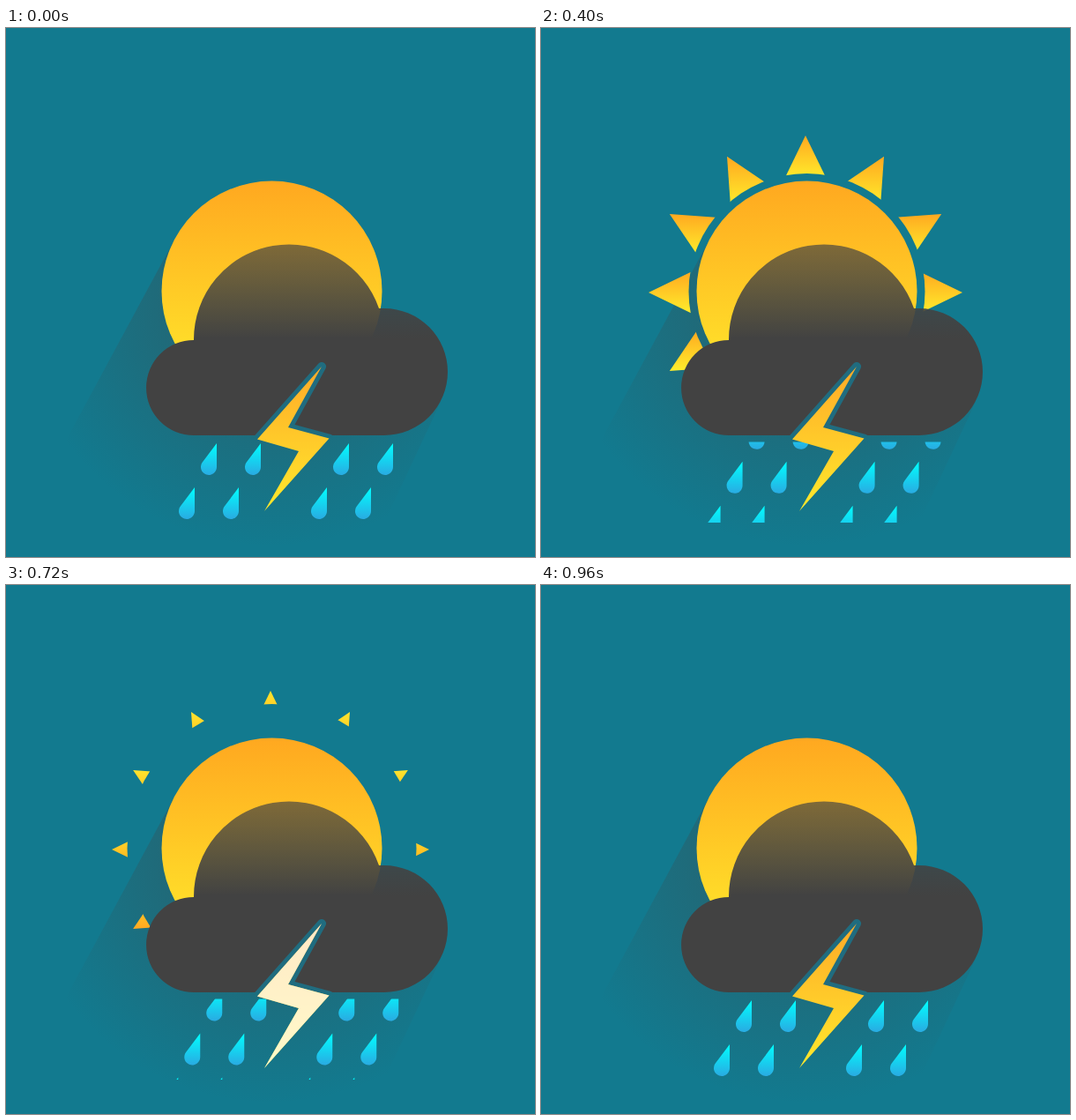
An HTML page that plays this animation: 600 px wide and 600 px high, repeating every 1 s.

```html
<!DOCTYPE html>
<html lang="en">
<head>
<meta charset="utf-8">
<title>Thunderstorm</title>
<style>
  html, body { margin: 0; width: 100%; height: 100%; overflow: hidden; background: #127a8f; }
  svg { display: block; width: 100vw; height: 100vh; }
</style>
</head>
<body>
<svg viewBox="0 0 600 600">
  <defs>
    <linearGradient id="warm" x2="0" y2="1">
      <stop stop-color="#ffa820"/><stop offset="1" stop-color="#ffee2c"/>
    </linearGradient>
    <linearGradient id="warmUp" x2="0" y2="1">
      <stop stop-color="#ffe42c"/><stop offset="1" stop-color="#ffa820"/>
    </linearGradient>
    <linearGradient id="boltFill" x2="0" y2="1">
      <stop stop-color="#ffaa28"/><stop offset="1" stop-color="#ffe92c"/>
    </linearGradient>
    <linearGradient id="water" x2="0" y2="1">
      <stop stop-color="#00ffff"/><stop offset="1" stop-color="#29abe2"/>
    </linearGradient>
    <linearGradient id="haze" gradientUnits="userSpaceOnUse" x1="0" y1="246" x2="0" y2="352">
      <stop stop-color="#424242" stop-opacity=".68"/><stop offset="1" stop-color="#424242"/>
    </linearGradient>
    <radialGradient id="shade" gradientUnits="userSpaceOnUse" cx="300" cy="300" r="288">
      <stop stop-color="#424242" stop-opacity=".5"/><stop offset="1" stop-color="#424242" stop-opacity="0"/>
    </radialGradient>
    <mask id="ring" maskUnits="userSpaceOnUse" x="0" y="0" width="600" height="600">
      <rect width="600" height="600" fill="#fff"/>
      <circle id="hole" cx="301.5" cy="299" r="134"/>
    </mask>
    <clipPath id="rainBox"><rect y="469.5" width="600" height="91.5"/></clipPath>
    <clipPath id="cloudBox"><rect width="600" height="462"/></clipPath>
    <path id="drop" d="M0 0V27A9 9 0 1 1 -16.2 21.6Z" fill="url(#water)"/>
    <path id="bolt" d="M358 384L320 453L366.5 465.5L293 548L332 480L285 466.5Z"/>
  </defs>
  <path d="M191 240L0 594L410 602L493 424Z" fill="url(#shade)"/>
  <g id="rays" mask="url(#ring)"></g>
  <circle cx="301.5" cy="298.5" r="125" fill="url(#warm)"/>
  <path d="M213 462A54 54 0 0 1 213 354A108 108 0 0 1 423 318H429A72 72 0 0 1 429 462Z" fill="url(#haze)"/>
  <use href="#bolt" clip-path="url(#cloudBox)" fill="none" stroke="#206c7f" stroke-width="10" stroke-linejoin="round"/>
  <g clip-path="url(#rainBox)"><g id="rain"></g></g>
  <use href="#bolt" fill="url(#boltFill)"/>
  <use id="flash" href="#bolt" fill="#fffffc" opacity="0"/>
</svg>
<script>
  const STEP = 40, STEPS = 25, LAST = STEPS - 1;
  const get = id => document.getElementById(id);
  const add = (parent, tag, attrs) => {
    const el = document.createElementNS('http://www.w3.org/2000/svg', tag);
    for (const key in attrs) el.setAttribute(key, attrs[key]);
    return parent.appendChild(el);
  };

  // Eight visible rays, clockwise from lower left to right
  const rays = [];
  for (let deg = -120; deg <= 90; deg += 30) {
    rays.push({ angle: deg * Math.PI / 180, el: add(get('rays'), 'polygon', {}) });
  }

  for (let row = -1; row < 2; row++) {
    for (const x of [239, 289, 389, 439]) {
      add(get('rain'), 'use', { href: '#drop', x: x - 25 * row, y: 471 + 50 * row });
    }
  }

  function rayPoints(angle, tip) {
    const sin = Math.sin(angle), cos = Math.cos(angle);
    const at = (r, side) => [300 + r * sin + side * cos, 300 - r * cos + side * sin]
      .map(v => v.toFixed(2)).join();
    return [at(tip, 0), at(tip - 50, 24.3), at(tip - 50, -24.3)].join(' ');
  }

  function flashAt(k) {
    if (k <= 14) return 0;
    return k < 16 ? (k - 14) / 2 : (LAST - k) / 8;
  }

  function draw(k) {
    const tip = Math.min(180, 126 + 5.2 * k);
    const fill = k < 11 ? 'url(#warm)' : 'url(#warmUp)';
    for (const { angle, el } of rays) {
      el.setAttribute('points', rayPoints(angle, tip));
      el.setAttribute('fill', fill);
    }
    get('hole').setAttribute('r', Math.max(134, 92 + 4 * k));
    const p = k / LAST;
    get('rain').setAttribute('transform', `translate(${-25 * p} ${50 * p})`);
    get('flash').setAttribute('opacity', flashAt(k));
  }

  const start = performance.now();
  function tick() {
    const time = Math.max(0, performance.now() - start);
    draw(Math.floor(time / STEP) % STEPS);
    requestAnimationFrame(tick);
  }
  draw(0);
  requestAnimationFrame(tick);
</script>
</body>
</html>
```
